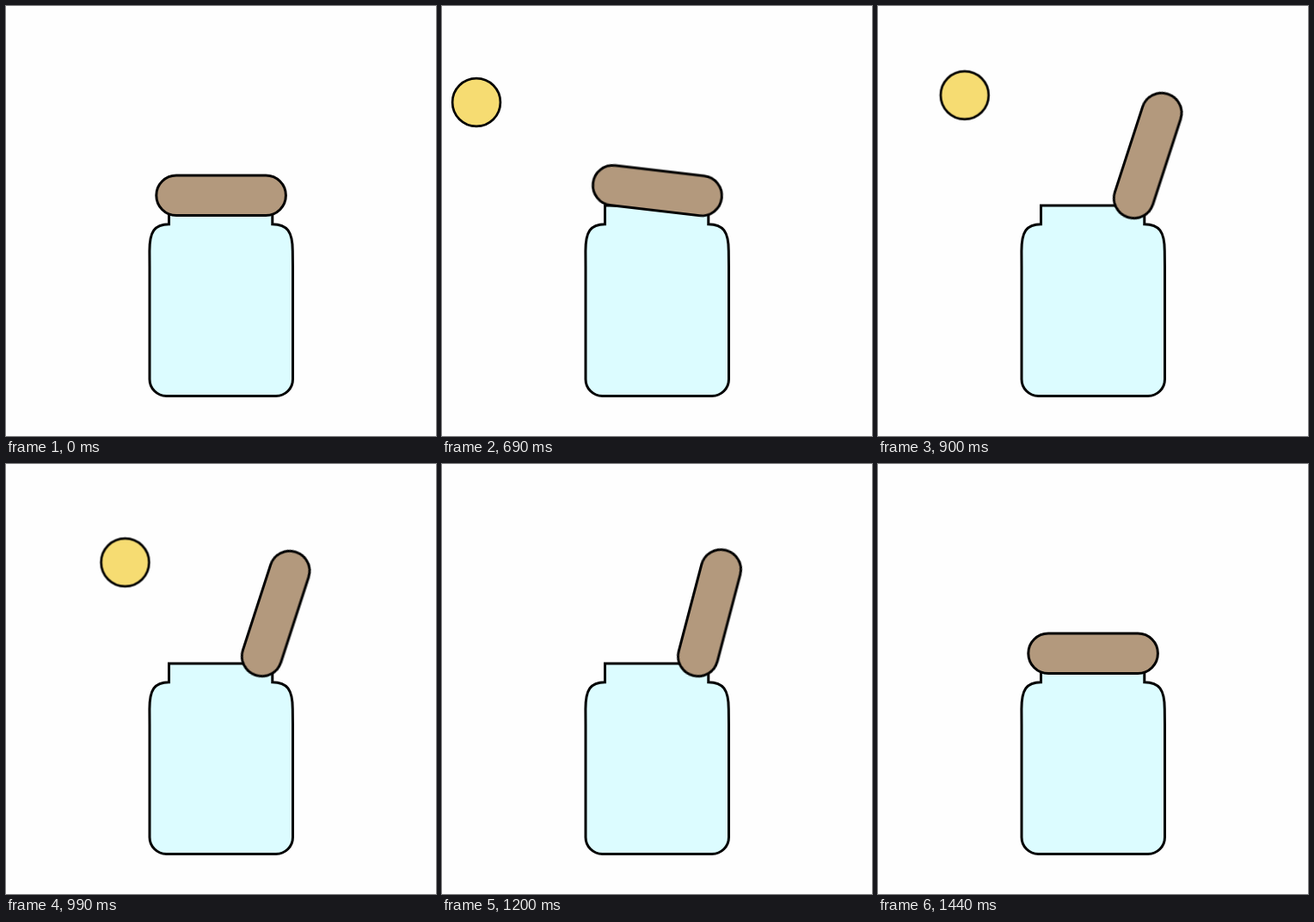
Recreate the animation shown at these times as an HTML page. Size 500 by 500 pixels, loop 1920 ms.

```html
<!DOCTYPE html>
<html lang="en">
<head>
<meta charset="utf-8">
<title>Jar</title>
<style>
  html, body { margin: 0; width: 100%; height: 100%; overflow: hidden; background: #fefefe; }
  svg { display: block; width: 100vw; height: 100vh; }
  .line { stroke: #000; stroke-width: 3; stroke-linejoin: miter; }
  #lid { transform-origin: 298.7px 220.2px; }
</style>
</head>
<body>
<svg viewBox="0 0 500 500">
  <circle id="ball" class="line" r="27.9" fill="#f6dc72" style="stroke-width:2.7"/>
  <path class="line" fill="#dcfcff" d="M189.5 232H309.8V253.7C327 254 333.3 262 333.3 285L333.5 303V434
    a19.5 19.5 0 0 1 -19.5 19.5H186.5a19.5 19.5 0 0 1 -19.5 -19.5V303L166.9 285C166.9 262 172.5 254 189.5 253.7Z"/>
  <rect id="lid" class="line" x="174.8" y="197" width="150.6" height="46.5" rx="23.25" fill="#b3997d"/>
</svg>
<script>
  const LOOP = 1920, STEP = 30, OPEN = 108;
  const APEX = { t: 820, x: 90, y: 102.5 };

  const progress = (t, from, to) => Math.min(1, Math.max(0, (t - from) / (to - from)));
  const easeInOut = p => (1 - Math.cos(Math.PI * p)) / 2;
  const bezier = (u, a, b, c, d) => {
    const v = 1 - u;
    return v * v * v * a + 3 * v * v * u * b + 3 * v * u * u * c + u * u * u * d;
  };

  function lidAt(t) {
    const angle = OPEN * (easeInOut(progress(t, 650, 900)) - easeInOut(progress(t, 1170, 1440)));
    return `rotate(${angle.toFixed(3)}deg)`;
  }

  // The ball slows into the top of its arc, then speeds up into the jar.
  function ballAt(t) {
    let x, y;
    if (t < APEX.t) {
      const d = Math.pow((APEX.t - t) / 130, 1.7);
      x = APEX.x - 50 * d;
      y = APEX.y + 9.5 * d * d;
    } else {
      const u = progress(t, APEX.t, 1188) ** 2;
      x = bezier(u, APEX.x, 165, 250, 250);
      y = bezier(u, APEX.y, 108, 174, 310);
    }
    return `translate(${x.toFixed(2)}px, ${y.toFixed(2)}px)`;
  }

  function play(id, pose) {
    const frames = [];
    for (let t = 0; t <= LOOP; t += STEP) {
      frames.push({ offset: t / LOOP, transform: pose(t), easing: 'steps(1, end)' });
    }
    document.getElementById(id).animate(frames, { duration: LOOP, iterations: Infinity });
  }

  play('lid', lidAt);
  play('ball', ballAt);
</script>
</body>
</html>
```
